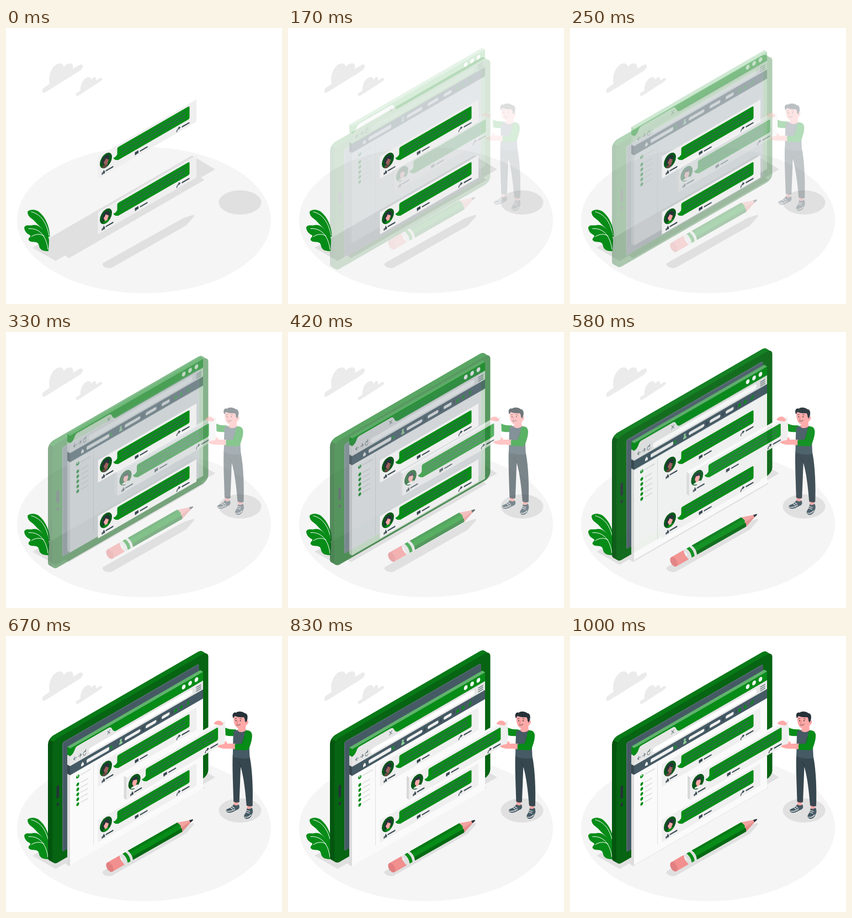
An HTML page that plays this animation: 500x500 px, repeating every 1.04 s.

```html
<!DOCTYPE html>
<html lang="en">
<head>
<meta charset="utf-8">
<title>Isometric message board</title>
<style>
  html, body { margin: 0; width: 100%; height: 100%; overflow: hidden; background: #fff; }
  svg { display: block; width: 100vw; height: 100vh; }
  .green { fill: #078c18; }
  .slate { fill: #455a64; }
  .ink { fill: #37474f; }
  .dark { fill: #263238; }
  .skin { fill: #ffa8a7; }
  .shade { fill: #e0e0e0; }
  .cloud { fill: #ebebeb; }
  .pale { fill: #fafafa; }
  .line { fill: none; stroke-linecap: round; stroke-linejoin: round; }
</style>
</head>
<body>
<svg viewBox="0 0 500 500">
  <defs>
    <clipPath id="disc"><ellipse rx="11" ry="12.7"/></clipPath>
    <g id="card">
      <rect width="178.5" height="40.5" fill="#efefef"/>
      <rect class="green" x="35" y="4.5" width="131" height="23.5" rx="2.5"/>
      <path class="green" d="M35.5 16Q33 20 28 19Q30 26 38 27.5Z"/>
      <path class="line" stroke="#455a64" stroke-width="1.2" d="M42 10.5H158M42 16H158M42 21.5H158"/>
      <path class="line" stroke="#37474f" stroke-width="2.3" d="M15 34.6H27M77 34.6H89M153 34.6H165"/>
      <path class="ink" d="M7 34h1.6v4H7zM9 34l1.5-3 1 .6v2h1.2v4H9zM67 31.5h6.500v5H70l-2 1.600v-1.600h-1z"/>
      <path class="line" stroke="#37474f" stroke-width="1.5" d="M143 38Q143 34 147 33.5"/>
      <path class="ink" d="M146 30.5l4 3-4 3z"/>
    </g>
    <g id="person">
      <ellipse rx="11" ry="12.7" fill="#06581a"/>
      <g clip-path="url(#disc)">
        <path fill="currentColor" d="M-2 4h5v6h-5z"/>
        <ellipse cx=".5" cy="1" rx="4.400" ry="5.600" fill="currentColor"/>
      </g>
    </g>
  </defs>

  <!-- Ground -->
  <ellipse cx="250" cy="348" rx="230" ry="132.500" fill="#f5f5f5"/>
  <path class="cloud" d="M68 117.500C64 117 65 111 69 108L79 101C76 90 80 74 91 66C98 62 103 64 105 70C110 63 119 62 121 67Q122.500 70 121 74L133 67C138 64 141 68 138 73Q136.500 76 133 78L72 116Z"/>
  <path class="cloud" d="M129 123C126 123 126 119 129 117L135 113C134 105 138 94 146 90C151 87 154 90 155 94C158 88 163 87 163 92V95L170 91C174 89 176 93 172 96L132 122Z"/>
  <g class="shade">
    <path d="M48 398L90 422 107 412 114 417 360 275 353 271 379 256 337 231Z"/>
    <path d="M177 425L322 344 339 338.500Q342 339 340 342L326 358 192 434Q184 437 177 432Q172 428 177 425Z"/>
    <ellipse cx="424" cy="316" rx="38.500" ry="22"/>
  </g>

  <!-- Plant -->
  <path class="green" d="M39 333C43 328 54 328 61 334C71 343 79 358 79.500 378H76C72 373 69 367 65 363C59 358 55 353 51 349C47 345 39 342 39 333Z"/>
  <path class="green" d="M33 361C36 356 41 358 46 357.500C55 355 60 359 66 364C73 369 78 377 78 386L77 404C69 405 61 402 60 395C59 389 56 388 50 387.500C42 388 38 383 43 379C45 377 44 375 41 374C36 371 33 366 33 361Z"/>
  <path class="line" stroke="#fff" stroke-width="1" d="M46 333C62 337 73 350 78 376M41 363.500C60 362 73 376 76 401M46 378C54 372 64 373 69 377"/>

  <!-- Tablet -->
  <g data-dx="0" data-dy="30">
    <g transform="translate(76 186.500) skewY(-30)">
      <g fill="#045510">
        <rect width="282" height="225.500" rx="10"/>
        <path d="M279.500 3.400l8 9.200L10.500 231.300l-8-9.200Z"/>
      </g>
      <path fill="#077a17" d="M3 4Q6 0 10 0H272Q277 0 280 4L288 14H12Z"/>
      <g transform="translate(8 9.200)">
        <rect width="282.500" height="225.500" rx="10" fill="#066412"/>
        <rect x="18" y="13" width="247.500" height="198" rx="3" fill="#5b6d76"/>
        <rect class="slate" x="19.500" y="14.500" width="246" height="196" rx="2"/>
        <rect class="dark" x="7.500" y="86" width="4.500" height="23" rx="2"/>
        <ellipse class="dark" cx="9.800" cy="120" rx="2.300" ry="3"/>
      </g>
    </g>
  </g>

  <!-- Browser window -->
  <g data-dx="0" data-dy="-30">
    <path fill="#5fb46c" d="M111 200.200L352 61 357 64 116 203.100Z"/>
    <g transform="translate(116 203.100) skewY(30)">
      <rect class="green" x="-5" width="5" height="14"/>
      <rect x="-5" y="14" width="5" height="198" fill="#dcdcdc"/>
      <rect class="ink" x="-5" y="32" width="5" height="16.500"/>
    </g>
    <g transform="translate(116 203.100) skewY(-30)">
      <rect class="pale" width="241" height="212"/>
      <rect class="green" width="241" height="17"/>
      <path fill="#e6e6e6" d="M0 33V14Q5 14 8 8Q10 3 13 3H70Q74 3 76 8Q79 16 84 16H241V33Z"/>
      <rect class="slate" y="32" width="241" height="16.500"/>
      <g fill="#fff">
        <ellipse cx="206" cy="7.500" rx="3.300" ry="4"/>
        <ellipse cx="217.500" cy="7.500" rx="3.300" ry="4"/>
        <ellipse cx="229" cy="7.500" rx="3.300" ry="4"/>
        <rect x="34" y="20" width="188" height="9" rx="4"/>
      </g>
      <g class="line" stroke="#607078" stroke-width="1">
        <path d="M68 8l4.500 6M72.500 8l-4.500 6M12 23H7m2-3l-2.500 3L9 26M15 23h5m-2-3l2.500 3L18 26M28 21a2.600 3.500 0 1 0 1 4M28.500 18v3.500H26"/>
        <path stroke-width="1.500" d="M229 21.500h8M229 25h8M229 28.500h8"/>
        <path d="M222 25l2-3 2 3-2 3z" stroke="#e0e0e0"/>
      </g>
      <g fill="#f0f0f0">
        <path d="M20 41l2.500-3.500L25 41v3.500H20z"/>
        <rect x="30" y="37.500" width="41" height="6.500" rx="2"/>
        <rect x="99" y="37.800" width="28.500" height="5.500" rx="2.500"/>
        <rect x="137" y="37.800" width="19.500" height="5.500" rx="2.500"/>
        <rect x="166" y="37.800" width="14.500" height="5.500" rx="2.500"/>
      </g>
      <path class="line" stroke="#263238" stroke-width="1" d="M132 37v7M161 37v7M185 37v7"/>
      <g class="line" stroke="#0b9a20" stroke-width="1.300">
        <circle cx="74" cy="40.500" r="1.700"/><path d="M75.500 42l1.500 2"/>
      </g>
      <g fill="#8fd19a"><circle cx="92" cy="38" r="2"/><path d="M89 45q0-5 3-5t3 5z"/></g>
      <path class="green" d="M189 39h5v5h-3l-2 2zM201 37l3 4v3h-5v-3zM211 43l3-6 3 2-3 6z"/>
      <path stroke="#e0e0e0" d="M42.500 53V199"/>
      <circle class="green" cx="14" cy="59" r="3"/>
      <circle cx="14" cy="58" r="1.200" fill="#e6f3e8"/>
      <path class="line" stroke="#dcdcdc" stroke-width="1.800" d="M20 59H37"/>
      <g id="menu"></g>
    </g>
  </g>

  <!-- Fixed messages -->
  <g transform="translate(166.500 232.500) skewY(-30)">
    <use href="#card"/>
    <g transform="translate(14.500 15.800)">
      <use href="#person" color="#9b5f5c"/>
      <path class="dark" d="M-7 3C-8-7-2-11 3-8C7-7 7-2 5 1Q2-1 0-4Q-2 0-4 1L-4 5Z"/>
      <path fill="#6e4547" d="M-7 9Q-5 6-2 7L3 8 1 12Q-3 13-7 9Z"/>
    </g>
  </g>
  <g transform="translate(166.500 333.500) skewY(-30)">
    <use href="#card"/>
    <g transform="translate(14.500 15.800)">
      <use href="#person" color="#ffa8a7"/>
      <path class="dark" d="M-6 6C-8-5-3-10 2-8C7-7 8 0 6 5L4 0Q1-1 0-4Q-2 0-4 1L-3 6Z"/>
      <path class="green" d="M-6 10Q-4 7-1 8L3 8Q6 8 7 10L2 13Z"/>
    </g>
  </g>

  <!-- Carried message -->
  <g data-dx="-30" data-dy="0">
    <path fill="#fafafa" d="M213 253.500L391 150.700 396.500 153.600 218 256.500Z"/>
    <path fill="#d9d9d9" d="M213 253.500L218 256.500V297L213 294Z"/>
    <g transform="translate(217.500 256.500) skewY(-30)">
      <use href="#card"/>
      <g transform="translate(14.500 15.800)">
        <use href="#person" color="#ffa8a7"/>
        <path class="dark" d="M-5 1C-7-6-3-9 1-8C6-8 7-3 5 1L4-2Q0-2-2-4L-4 0Z"/>
        <path fill="#f5f5f5" d="M-7 9Q-4 6-1 8L4 8Q6 8 7 10L2 13Z"/>
      </g>
    </g>
  </g>

  <!-- Man -->
  <g data-dx="-30" data-dy="0">
    <path class="skin" d="M376 158C379 154 384 152 388 154L393 158Q392 162 389 162Q383 161 377 160Z"/>
    <path class="green" d="M396.500 166Q405 170 416 169L414 181Q404 182 397 180Z"/>
    <path class="skin" d="M412 300h8v8h-8zM436 305h8v10h-8z"/>
    <path class="ink" d="M410 216L441 219C446 245 447 279 446 308Q440 310 435 307C433 281 430 256 424.500 237L422 301Q416 303 411.500 300C411 275 409 240 410 216Z"/>
    <path class="line" stroke="#263238" stroke-width=".8" d="M424.500 237Q424 231 419 228"/>
    <g class="slate">
      <path d="M412 305Q417 309 421 305Q424 311 420 314C414 316 409 321 402 320Q396 318 399 314C405 312 409 309 412 305Z"/>
      <path d="M436 312Q440 315 445 311Q448 318 445 323C443 329 439 332 434 331Q429 329 431 324C434 320 435 316 436 312Z"/>
    </g>
    <path class="line" stroke="#f0f0f0" stroke-width="1.200" d="M399 317Q406 319 414 314M409 309l4 3M406 311l4 3M432 328Q438 330 443 324M435 316l6 2M434 319l6 2"/>
    <path class="slate" d="M412 172Q424 167 437 171C440 186 440 205 441 221Q425 224 410 218C411 202 410 185 412 172Z"/>
    <path class="skin" d="M421 162L433 160 434 171Q427 177 419 172Z"/>
    <path class="skin" d="M412 147Q423 140 434 146L435 153C439 151 440 158 435 161C433 167 427 168 420 167C414 165 411 157 412 147Z"/>
    <path class="dark" d="M411 149C408 143 411 137 416 139C420 135 429 137 432 140C437 140 438 147 436 153L434 157 432 153Q432 149 430 147Q421 148 414 145Z"/>
    <g class="dark"><circle cx="416" cy="153.500" r="1"/><circle cx="424" cy="153.500" r="1"/></g>
    <path class="line" stroke="#263238" stroke-width=".8" d="M414 150l3-.5M423 149.500l3 1M417 161Q421 163 424 160"/>
    <path class="line" stroke="#e57373" stroke-width=".9" d="M419 153l-1.500 5h2"/>
    <path class="skin" d="M415 195L400 195Q399 190 396 191Q396 195 393 196L384 198Q381 200 385 202Q393 205 402 204L415 205Z"/>
    <path class="green" d="M435 171Q443 170 445 178C446 187 442 197 440 203Q438 207 433 207L414 206V196L427 195 431 182Q431 174 435 171Z"/>
    <path class="line" stroke="#056a12" stroke-width=".8" d="M431 182L427 195"/>
  </g>

  <!-- Pencil -->
  <g data-dx="0" data-dy="-30">
    <g transform="translate(188 418) rotate(-29.700)">
      <path fill="#f28f8f" d="M0-9.500H26Q22 0 26 9.500H0Z"/>
      <ellipse rx="5.500" ry="9.500" fill="#e27f80"/>
      <path class="shade" d="M25-9.500H45V9.500H25Q29 0 25-9.500Z"/>
      <path class="green" d="M32-9.500H38Q42 0 38 9.500H32Q36 0 32-9.500Z"/>
      <path class="green" d="M43-9.500H146L150 0 146 9.500H43Q47 0 43-9.500Z"/>
      <path fill="#067a16" d="M43-9.500H146L148-5H45Z"/>
      <path fill="#066814" d="M45 3.500H149L146 9.500H43Q45 6 45 3.500Z"/>
      <path fill="#f2a3a0" d="M146-9.500L174 0 146 9.500Q150 5 147 2Q151-3 146-9.500Z"/>
      <path fill="#e58d8b" d="M147 2L174 0 146 9.500Q149 5 147 2Z"/>
      <path class="dark" d="M167-2.400L172.500-1.200Q175 0 172.500 1.200L167 2.400Z"/>
    </g>
  </g>
</svg>
<script>
  const LOOP = 1040, FPS = 24;
  const layers = [...document.querySelectorAll('[data-dx]')];

  document.getElementById('menu').innerHTML = [73, 82, 91, 100, 109].map(y =>
    `<ellipse class="green" cx="14" cy="${y}" rx="2.600" ry="3"/>
     <path class="line" stroke="#dcdcdc" stroke-width="1.800" d="M20 ${y}H32"/>`).join('');

  const cubic = (s, a, b) => 3 * a * s * (1 - s) ** 2 + 3 * b * s * s * (1 - s) + s ** 3;

  // Ease with overshoot: cubic-bezier(.36, -.01, .5, 1.38)
  function ease(x) {
    let lo = 0, hi = 1;
    for (let i = 0; i < 24; i++) {
      const mid = (lo + hi) / 2;
      if (cubic(mid, 0.36, 0.5) < x) lo = mid; else hi = mid;
    }
    return cubic(lo, -0.01, 1.38);
  }

  function progress(ms) {
    const step = Math.floor((ms + 5) * FPS / 1000);
    if (step < 2) return 0;
    return step >= FPS - 1 ? 1 : ease((step + 1) / FPS);
  }

  const start = performance.now();
  function draw() {
    const p = progress((performance.now() - start) % LOOP);
    for (const el of layers) {
      const { dx, dy } = el.dataset;
      el.setAttribute('transform', `translate(${dx * (1 - p)} ${dy * (1 - p)})`);
      el.setAttribute('opacity', Math.min(1, Math.max(0, p)));
    }
    requestAnimationFrame(draw);
  }
  draw();
</script>
</body>
</html>
```
